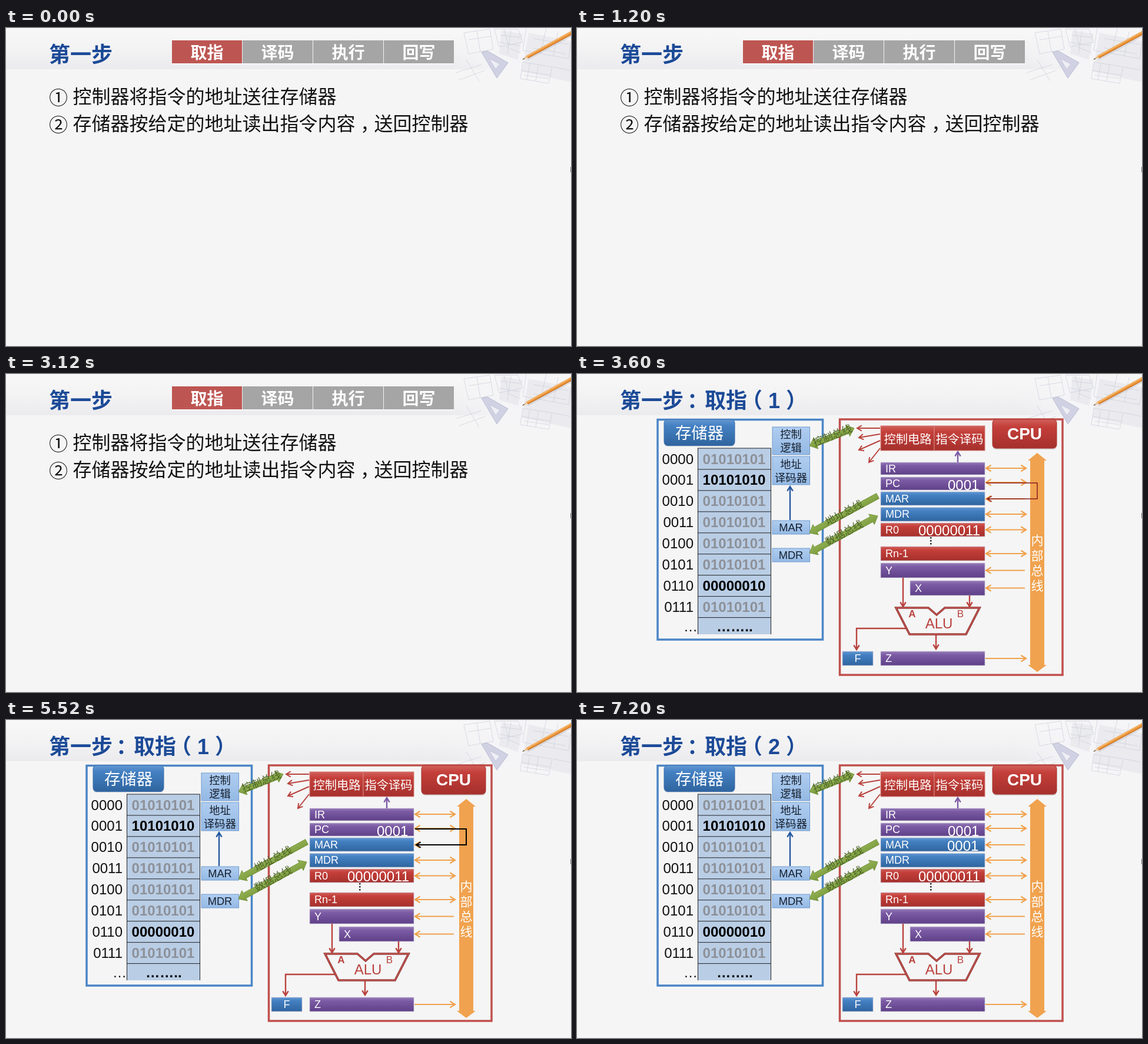
An HTML page for the animation above (8000 ms loop, 960 by 540 pixels).

```html
<!DOCTYPE html>
<html lang="zh-CN">
<head>
<meta charset="utf-8">
<title>取指</title>
<style>
html, body { margin: 0; width: 100%; height: 100%; overflow: hidden; background: #f5f5f5; }
svg { display: block; width: 960px; height: 540px; }
text { font-family: "Liberation Sans", "Noto Sans CJK SC", sans-serif; white-space: pre; }
.cjk { font-family: "Noto Sans CJK SC", sans-serif; }
.title { font-size: 36px; font-weight: 700; fill: #1c4a97; }
.part { animation: 8s step-end infinite; }
#intro { animation-name: intro; }
#diagram { animation-name: diagram; }
#one { animation-name: one; }
#two { animation-name: two; }
#thin { animation-name: thin; }
#bold { animation-name: bold; }
#mar { animation-name: mar; }
@keyframes intro { 0% { opacity: 1 } 45%, 100% { opacity: 0 } }
@keyframes diagram { 0% { opacity: 0 } 45%, 100% { opacity: 1 } }
@keyframes one { 0% { opacity: 1 } 90%, 100% { opacity: 0 } }
@keyframes two { 0% { opacity: 0 } 90%, 100% { opacity: 1 } }
@keyframes thin { 0% { opacity: 1 } 60%, 100% { opacity: 0 } }
@keyframes bold { 0% { opacity: 0 } 60% { opacity: 1 } 90%, 100% { opacity: 0 } }
@keyframes mar { 0% { opacity: 0 } 75% { opacity: .2 } 90%, 100% { opacity: 1 } }
</style>
</head>
<body>
<svg viewBox="0 0 960 540">
  <defs>
    <linearGradient id="head" x2="0" y2="1">
      <stop offset="0" stop-color="#f8f8f8"/><stop offset=".5" stop-color="#f3f3f4"/><stop offset="1" stop-color="#ebebee"/>
    </linearGradient>
    <linearGradient id="red" x2="0" y2="1">
      <stop offset="0" stop-color="#d2605b"/><stop offset=".25" stop-color="#c43f3a"/><stop offset="1" stop-color="#a5302c"/>
    </linearGradient>
    <linearGradient id="blue" x2="0" y2="1">
      <stop offset="0" stop-color="#6398d2"/><stop offset=".25" stop-color="#4480c2"/><stop offset="1" stop-color="#2f659f"/>
    </linearGradient>
    <linearGradient id="purple" x2="0" y2="1">
      <stop offset="0" stop-color="#967bb8"/><stop offset=".25" stop-color="#7c5ba5"/><stop offset="1" stop-color="#5f4188"/>
    </linearGradient>
    <linearGradient id="pale" x2="0" y2="1">
      <stop offset="0" stop-color="#b0cdf0"/><stop offset="1" stop-color="#94b9e4"/>
    </linearGradient>
    <linearGradient id="green" x2="0" y2="1">
      <stop offset="0" stop-color="#95b356"/><stop offset="1" stop-color="#7a9a3c"/>
    </linearGradient>
    <radialGradient id="glow">
      <stop offset=".35" stop-color="#f5f5f7"/><stop offset="1" stop-color="#f5f5f7" stop-opacity="0"/>
    </radialGradient>
  </defs>
  <rect width="960" height="540" fill="#f5f5f5"/>
  <rect width="960" height="70" fill="url(#head)"/>
  <ellipse cx="890" cy="42" rx="140" ry="80" fill="url(#glow)"/>

  <path d="M842 4l36 6-8 44-32-10zM888 8l72 14v70l-84-18z" fill="#e4e5ec" opacity=".6"/>
  <g fill="none" stroke="#c6c8d6" stroke-width=".8" opacity=".75">
    <path d="M778 8l44-6 6 34-42 8zM786 20l38-6M800 5l6 36M830 2h40l8 22-40 8zM846 2l8 28M764 76l44-14M770 88l44-16M782 54l22 36"/>
    <path d="M884 0l-6 38 78 14 4-30M896 18l60 10M918 0l-10 44M938 6l-8 42M878 58l50 8-6 28-48-8zM890 60l-5 28M905 62l-5 28M876 72l48 8"/>
    <path d="M840 12l34 4M838 24l34 6M858 4l-6 40M850 32l24 10M896 34l56 10M930 66l28 6M880 80l42 6"/>
  </g>
  <path d="M808 41l10-2 35 20-19 26z" fill="#d0d2e3" stroke="#b9bbd2"/>
  <path d="M821 52l18 9-7 9z" fill="#eeeef5" stroke="#bfc2d9" stroke-width=".8"/>
  <path d="M886 54L960 14" stroke="#b9b9c2" stroke-width="2" opacity=".4"/>
  <path d="M877 54l7-7 3 4z" fill="#e8c79a"/>
  <path d="M877 54l3-3 1 1.500z" fill="#4b423e"/>
  <path d="M884 47L960 5v7l-73 39.500z" fill="#ea9338"/>
  <path d="M885 48L960 6.500" stroke="#f6bd72" stroke-width="1.500"/>
  <path d="M887 51L960 11.500" stroke="#b9651f"/>
  <rect x="959" y="236" width="1" height="9" fill="#777"/>

  <text class="cjk title" x="73" y="58">第一步</text>
  <g class="part" id="intro"></g>
  <g class="part" id="diagram">
    <g id="base"></g>
    <g class="part" id="one">
      <text class="title" x="325" y="58">1</text>
      <g class="part" id="thin"></g>
    </g>
    <g class="part" id="bold"></g>
    <text class="part title" id="two" x="325" y="58">2</text>
    <text class="part" id="mar" x="629" y="222" font-size="24" style="fill:#fff">0001</text>
  </g>
</svg>
<script>
const RED = '#b9433e', ORANGE = '#f0a24e', WHITE = '#fff';
let layer;

function into(id) { layer = document.getElementById(id); }

function add(tag, attrs, content) {
  const el = document.createElementNS('http://www.w3.org/2000/svg', tag);
  for (const k in attrs) el.setAttribute(k, attrs[k]);
  if (content) el.textContent = content;
  layer.append(el);
}

function label(s, x, y, size, fill, more) {
  add('text', { x, y, 'font-size': size, fill, ...more }, s);
}
const mid = { 'text-anchor': 'middle' };
const strong = { 'font-weight': 700 };
const han = { class: 'cjk' };
const cjk = { ...han, ...mid };

function box(x1, y1, x2, y2, fill, more) {
  add('rect', { x: x1, y: y1, width: x2 - x1, height: y2 - y1, fill, ...more });
}

// Polyline with open heads; points is a flat list of coordinates
function arrow(points, stroke, width = 2, both = false, size = 9) {
  const p = points, n = p.length;
  const head = (x, y, fx, fy) => {
    const a = Math.atan2(fy - y, fx - x);
    const side = t => `${x + size * Math.cos(a + t)} ${y + size * Math.sin(a + t)}`;
    return `M${side(.55)}L${x} ${y}L${side(-.55)}`;
  };
  let d = 'M' + p.join(' ') + head(p[n - 2], p[n - 1], p[n - 4], p[n - 3]);
  if (both) d += head(p[0], p[1], p[2], p[3]);
  add('path', { d, fill: 'none', stroke, 'stroke-width': width });
}

function bus(name, x1, y1, x2, y2, both) {
  const len = Math.hypot(x2 - x1, y2 - y1), deg = Math.atan2(y2 - y1, x2 - x1) * 180 / Math.PI;
  const end = both ? `${len - 12} -5 ${len - 12} -10 ${len} 0 ${len - 12} 10 ${len - 12} 5` : `${len} -5 ${len} 5`;
  const transform = `translate(${x1} ${y1}) rotate(${deg})`;
  add('polygon', { points: `0 0 12 -10 12 -5 ${end} 12 5 12 10`, fill: 'url(#green)', stroke: '#71903a', 'stroke-width': .8, transform });
  label(name, len / 2 + 2, 4, 17.5, '#4c6425', { ...cjk, transform });
}

into('intro');
['取指', '译码', '执行', '回写'].forEach((s, i) => {
  const x = 282 + 120 * i;
  box(x, 21, x + 119, 60, i ? '#a5a5a5' : '#bd5652');
  label(s, x + 59.5, 51.5, 28, WHITE, { ...cjk, ...strong });
});
box(282, 60, 761, 61.5, '#fbfbfb');
label('①', 73, 130, 32, '#111', han);
label('②', 73, 176, 32, '#111', han);
label('控制器将指令的地址送往存储器', 113.5, 127.5, 32, '#111', han);
label('存储器按给定的地址读出指令内容', 113.5, 173.5, 32, '#111', han);
label('，', 602, 173.5, 32, '#111', han);
label('送回控制器', 625.5, 173.5, 32, '#111', han);

into('base');
const title = { class: 'cjk title' };
label('：', 187, 58, 36, '', title);
label('取指', 217, 58, 36, '', title);
label('（', 279, 58, 36, '', title);
label('）', 355, 58, 36, '', title);

// Memory
box(137, 77.5, 417.5, 451, 'none', { stroke: '#4a85c6', 'stroke-width': 3.5 });
box(148, 78, 268, 123, '#9aa4b4', { rx: 6, opacity: .5 });
box(148, 77, 268, 121.5, 'url(#blue)', { rx: 6, stroke: '#3d6fae' });
label('存储器', 208, 109.5, 27.3, WHITE, cjk);
box(205, 126, 329.5, 442, '#b9cde5');
for (let i = 0; i < 9; i++) {
  const y = 126 + 35.95 * i, base = y + 26.5;
  add('path', { d: `M205 ${y}h124.5`, stroke: '#222' });
  if (i == 8) break;
  const value = { 1: '10101010', 6: '00000010' }[i];
  label(i.toString(2).padStart(4, '0'), 198, base, 24, '#111', { 'text-anchor': 'end' });
  label(value || '01010101', 267, base, 24, value ? '#000' : '#8d9199', { ...mid, ...strong });
}
label('…', 181, 437, 24, '#111');
label('……..', 268, 437, 24, '#000', { ...mid, ...strong });
add('path', { d: 'M205.5 126V442M329.5 126V442', stroke: '#222' });

[[90, 137, ['控制', 102], ['逻辑', 125]], [140, 188, ['地址', 153], ['译码器', 176]],
 [249, 272, ['MAR', 260.5]], [296, 319, ['MDR', 307.5]]].forEach(([y1, y2, ...lines]) => {
  box(332, y1, 395.5, y2, 'url(#pale)', { stroke: '#6f9bd0' });
  for (const [s, y] of lines) label(s, 363.5, y + 6.5, 18.3, '#16202f', mid);
});
arrow([362, 248, 362, 191], '#2458a0', 2.4);

// CPU
box(446.5, 77, 825, 511, 'none', { stroke: '#c0504d', 'stroke-width': 3.5 });
box(706, 79, 815, 128, '#a89a9a', { rx: 6, opacity: .5 });
box(706, 77, 815, 126, 'url(#red)', { rx: 6, stroke: '#a8332f' });
label('CPU', 760.5, 111, 28, WHITE, { ...mid, ...strong });
box(516, 88, 607, 130, 'url(#red)', { stroke: '#d8837f' });
box(607, 88, 693, 130, 'url(#red)', { stroke: '#d8837f' });
label('控制电路', 562, 117.5, 20.3, WHITE, cjk);
label('指令译码', 650, 117.5, 20.3, WHITE, cjk);

[[92, 476, 92], [102, 479, 108], [113, 479, 129], [126, 496, 150]]
  .forEach(([y, x2, y2]) => arrow([515, y, x2, y2], RED));

bus('控制总线', 395, 122, 471, 92, true);
bus('地址总线', 395, 270, 511, 207, false);
bus('数据总线', 395, 304, 511, 241, true);

[['IR', 150, 171, 'purple'], ['PC', 175, 197, 'purple'], ['MAR', 200, 223, 'blue'], ['MDR', 226.5, 250, 'blue'],
 ['R0', 253, 276, 'red'], ['Rn-1', 293, 317, 'red'], ['Y', 321, 346, 'purple'], ['X', 351, 376, 'purple', 566],
 ['Z', 471, 495, 'purple'], ['F', 471, 495, 'blue', 451, 503]].forEach(([s, y1, y2, color, x = 516, x2 = 693]) => {
  box(x, y1, x2, y2, `url(#${color})`, { stroke: '#c9c3d6', 'stroke-width': .7 });
  label(s, s == 'F' ? 471.5 : x + 8, (y1 + y2) / 2 + 6, 18, WHITE);
});
label('0001', 630, 197, 24, WHITE);
label('00000011', 580, 274, 24, WHITE);
for (const y of [277, 282, 287]) box(600, y, 602.5, y + 2.5, '#222');

// Internal bus
for (const y of [160, 184, 238, 264.5, 305]) arrow([695, y, 763, y], ORANGE, 2.2, true, 10);
for (const y of [212, 333.5, 363.5]) arrow([761, y, 695, y], ORANGE, 2.2, false, 10);
arrow([694, 483, 763, 483], ORANGE, 2.2, false, 10);
add('polygon', { points: '782 134 798 147 794 147 794 494 798 494 782 506 766 494 770 494 770 147 766 147', fill: ORANGE });
[...'内部总线'].forEach((s, i) => label(s, 782, 290 + 25.6 * i, 21, WHITE, cjk));

// ALU
arrow([647, 150, 647, 132], '#7c5ba5', 2.4);
arrow([554, 346, 554, 395], RED, 2.4);
arrow([667, 376, 667, 395], RED, 2.4);
arrow([610, 443, 610, 467], RED, 2.4);
arrow([561, 432, 475, 432, 475, 468], RED, 2.4);
const alu = '542 397 597 397 611 409 625 397 684 397 661 442 565 442';
add('polygon', { points: alu, fill: '#f5f5f5', stroke: '#85302c', 'stroke-width': 3.6 });
add('polygon', { points: alu, fill: 'none', stroke: '#c0504d', 'stroke-width': 2 });
label('A', 569.5, 413, 17, RED, { ...mid, ...strong });
label('B', 651.5, 413, 17, RED, mid);
label('ALU', 615, 432, 24, RED, mid);

const route = [695, 185, 782, 185, 782, 212, 697, 212];
into('thin');
arrow(route, '#8a1c1c', 1.5);
into('bold');
arrow(route, '#000', 2);
</script>
</body>
</html>
```
